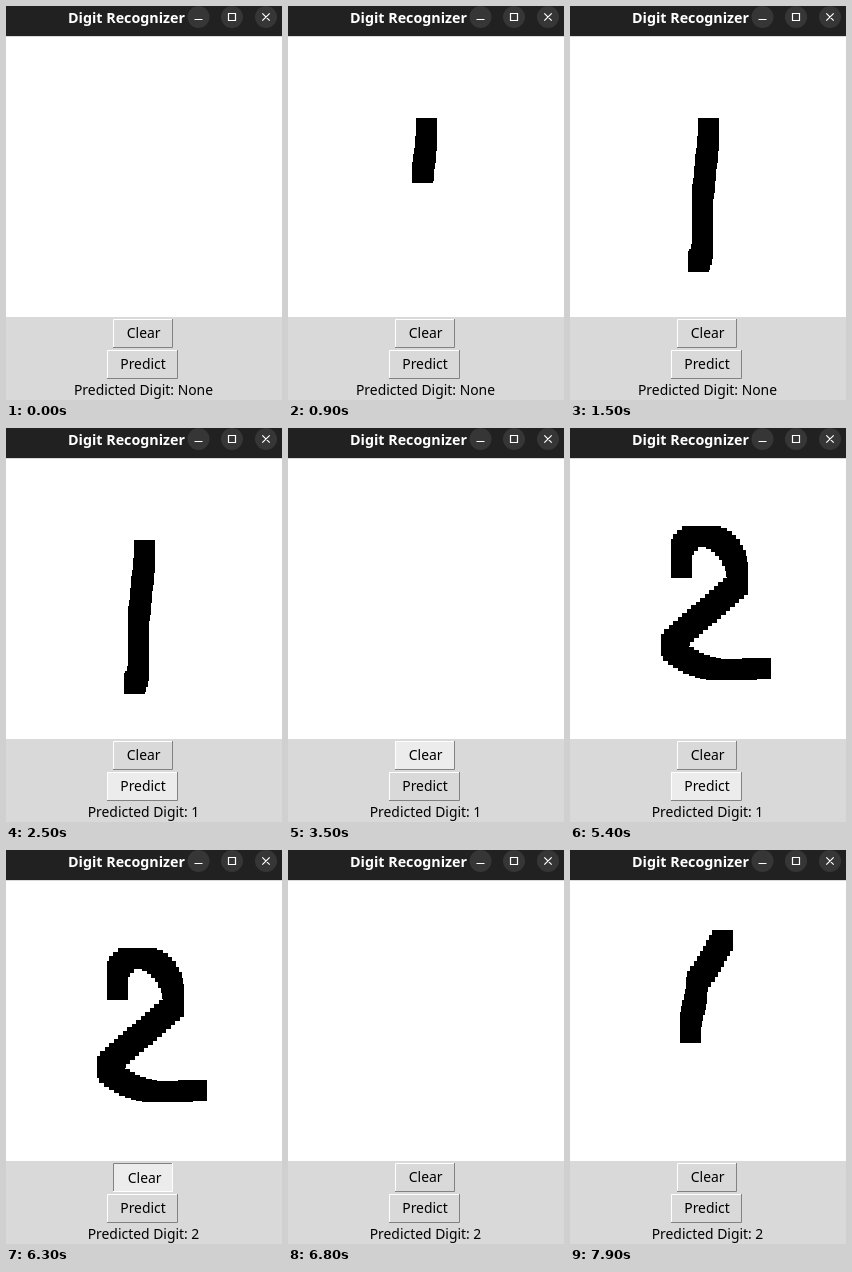
Animation, 276 px wide and 394 px high, one loop 8000 ms. Source, as an HTML page with a canvas:

```html
<!DOCTYPE html>
<html lang="en">
<head>
<meta charset="utf-8">
<title>Digit Recognizer</title>
<style>
  html, body { margin: 0; width: 276px; height: 394px; overflow: hidden; background: #d9d9d9; }
  body { position: relative; font: 13.9px "Noto Sans", "Open Sans", sans-serif; }
  canvas { position: absolute; left: 0; top: 31px; background: #fff; }
  svg { position: absolute; left: 0; top: 0; }
  text { text-anchor: middle; }
  .title { font-size: 14.3px; font-weight: bold; fill: #fff; }
  .icon { fill: none; stroke: #fff; stroke-width: 1.2; }
  .btn rect { fill: #d9d9d9; }
  .btn path { fill: none; }
  .btn .lit { stroke: #fff; }
  .btn .shade { stroke: #828282; }
  .btn.hover rect { fill: #ececec; }
  .btn.down .lit { stroke: #828282; }
  .btn.down .shade { stroke: #fff; }
  .btn.down text { transform: translate(1px, 1px); }
</style>
</head>
<body>
<canvas id="pad" width="276" height="280"></canvas>
<svg width="276" height="394">
  <rect width="276" height="30" fill="#212121"/>
  <text class="title" x="120.5" y="17">Digit Recognizer</text>
  <g fill="#363636">
    <circle cx="192.5" cy="11" r="11"/>
    <circle cx="226" cy="11" r="11"/>
    <circle cx="260" cy="11" r="11"/>
  </g>
  <path class="icon" d="M188.5 13.5h8M222.5 7.5h7v7h-7zM256.3 7.3l7.4 7.4m0-7.4l-7.4 7.4"/>
  <g class="btn" id="clear">
    <rect x="107" y="313" width="60" height="29"/>
    <path class="shade" d="M107 341.5h59.5V313"/>
    <path class="lit" d="M107.5 341V313.5H166"/>
    <text x="137.7" y="332">Clear</text>
  </g>
  <g class="btn" id="predict">
    <rect x="101" y="344" width="71" height="29"/>
    <path class="shade" d="M101 372.5h70.5V344"/>
    <path class="lit" d="M101.5 372V344.5H171"/>
    <text x="137" y="363">Predict</text>
  </g>
  <text id="label" x="137.5" y="389"></text>
</svg>
<script>
const LOOP = 8000, TICK = 100, BRUSH = 21, SPACING = 6, PAD_TOP = 31;
const $ = id => document.getElementById(id);
const ctx = $('pad').getContext('2d');

// Paths of the brush's top left corner; power shapes the speed
const strokes = [
  { start: 600, end: 1500, power: 1, d: 'M128 112V122L121.5 186V236L118 245' },
  { start: 3900, end: 4600, power: 1,
    d: 'M101 129V108L111 98H127C141 98 155 114 157 131V146L91 204V207' },
  { start: 4600, end: 5000, power: 2, d: 'M91 207V210Q110 228 135 231H156L180 230' },
  { start: 7500, end: 7900, power: 1, d: 'M142 80L127 106L116 123V135L110 160V172' }
];
for (const s of strokes) {
  s.path = document.createElementNS('http://www.w3.org/2000/svg', 'path');
  s.path.setAttribute('d', s.d);
  s.length = s.path.getTotalLength();
}

// The pointer crosses Clear, presses Predict, then returns to press Clear
const rounds = [
  { digit: 1, enter: 1800, aim: 2000, predict: 2300, back: 2700, clear: 3200, leave: 3800 },
  { digit: 2, enter: 5200, aim: 5300, predict: 5500, back: 5800, clear: 6300, leave: 6800 }
];

const within = (t, from, to) => t >= from && t < to;
const pressed = (t, from) => within(t, from, from + TICK);

function drawStroke(s, t) {
  const reach = s.length * Math.min(1, (t - s.start) / (s.end - s.start)) ** s.power;
  const stamp = at => {
    const { x, y } = s.path.getPointAtLength(at);
    ctx.fillRect(Math.round(x), Math.round(y) - PAD_TOP, BRUSH, BRUSH);
  };
  for (let at = 0; at < reach; at += SPACING) stamp(at);
  stamp(reach);
}

function setButton(id, hover, down) {
  $(id).classList.toggle('hover', hover);
  $(id).classList.toggle('down', down);
}

function render(t) {
  const wiped = Math.max(0, ...rounds.map(r => r.clear + TICK).filter(c => c <= t));
  ctx.clearRect(0, 0, 276, 280);
  for (const s of strokes) if (s.start >= wiped && t > s.start) drawStroke(s, t);

  const aiming = rounds.some(r => within(t, r.aim, r.back));
  const inside = rounds.some(r => within(t, r.enter, r.leave));
  setButton('predict', aiming, rounds.some(r => pressed(t, r.predict)));
  setButton('clear', inside && !aiming, rounds.some(r => pressed(t, r.clear)));

  const guess = rounds.filter(r => t >= r.predict + TICK).pop();
  $('label').textContent = 'Predicted Digit: ' + (guess ? guess.digit : 'None');
}

function frame() {
  render(Math.floor(performance.now() % LOOP / TICK) * TICK);
  requestAnimationFrame(frame);
}
frame();
</script>
</body>
</html>
```
